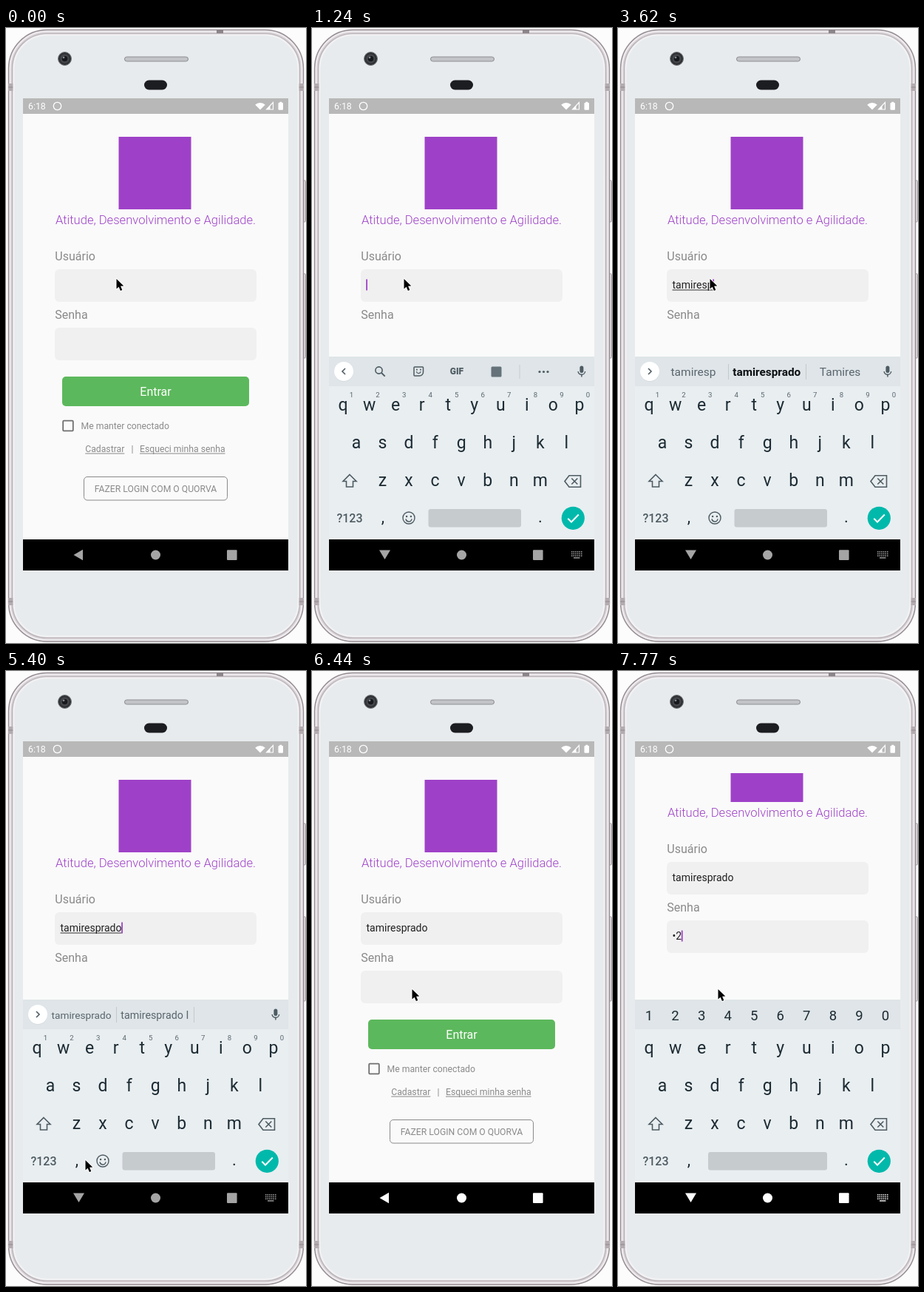
These frames come from a looping animation (406 by 831 pixels, 8000 ms). An HTML page with a canvas:

```html
<!DOCTYPE html>
<html lang="pt-BR">
<head>
<meta charset="utf-8">
<title>Login</title>
<style>
html, body { margin: 0; width: 100%; height: 100%; overflow: hidden; background: #fcfcfc; }
canvas { display: block; width: 406px; height: 831px; }
</style>
</head>
<body>
<canvas id="stage"></canvas>
<script>
const W = 406, H = 831, LOOP = 8000;
const canvas = document.getElementById('stage');
const ratio = window.devicePixelRatio || 1;
canvas.width = W * ratio;
canvas.height = H * ratio;
const c = canvas.getContext('2d');

const PURPLE = '#9e41c8', GREY = '#8a8a8a', INK = '#1c2b33', ICON = '#4d5b62';
const USER = 'tamiresprado', FIRST = 7;   // FIRST: letters in the given name
const KEY = 35.55;                        // distance between keys

// ---------- drawing helpers ----------
function paint(fill, stroke, lw) {
  if (fill) { c.fillStyle = fill; c.fill(); }
  if (stroke) { c.strokeStyle = stroke; c.lineWidth = lw; c.stroke(); }
}
function box(x, y, w, h, r, fill, stroke, lw = 1) {
  c.beginPath();
  c.roundRect(x, y, w, h, r);
  paint(fill, stroke, lw);
}
function disc(x, y, r, fill, stroke, lw = 1) {
  c.beginPath();
  c.arc(x, y, r, 0, Math.PI * 2);
  paint(fill, stroke, lw);
}
function arc(x, y, r, color, lw) {
  c.beginPath();
  c.arc(x, y, r, .1, Math.PI - .1);
  paint(null, color, lw);
}
function poly(points, fill, stroke, lw = 1, closed = true) {
  c.beginPath();
  for (let i = 0; i < points.length; i += 2) c.lineTo(points[i], points[i + 1]);
  if (closed) c.closePath();
  paint(fill, stroke, lw);
}
function line(points, color, lw) { poly(points, null, color, lw, false); }
function setFont(size, weight) { c.font = `${weight} ${size}px Roboto, sans-serif`; }
function text(str, x, y, size, color, align = 'left', weight = 400) {
  setFont(size, weight);
  c.textAlign = align;
  c.fillStyle = color;
  c.fillText(str, x, y);
  return c.measureText(str).width;
}
function keyRow(keys, x, y, size, color = INK) {
  [...keys].forEach((k, i) => text(k, x + i * KEY, y, size, color, 'center'));
}

const clamp = (v, lo, hi) => Math.min(hi, Math.max(lo, v));
const cap = s => s.charAt(0).toUpperCase() + s.slice(1);

const TICK = 148.4, LEAD = 500;
const OPEN = 3, CLOSE = 36, REOPEN = 41;
const bursts = [[9, 5], [16, 2], [21, 2], [24, 3]];   // start tick, letters
const path = [
  [-1, 149, 338], [2, 124, 338], [23, 124, 338], [27, 113, 674],
  [29, 113, 674], [33, 107, 660], [36, 96, 712], [40, 135, 429]
];

function mouseAt(k) {
  if (k <= path[0][0]) return path[0].slice(1);
  const i = path.findIndex(p => p[0] >= k);
  if (i < 0) return path[path.length - 1].slice(1);
  const [k0, x0, y0] = path[i - 1], [k1, x1, y1] = path[i];
  const u = (k - k0) / (k1 - k0), e = u * u * (3 - 2 * u);
  return [x0 + (x1 - x0) * e, y0 + (y1 - y0) * e];
}

const ramp = (k, from) => clamp((k - from) / 2, 0, 1);

function suggestions(n) {
  const now = USER.slice(0, n);
  if (n === USER.length) return [USER, USER + ' I', ''];
  if (n > FIRST + 1) return [now, USER, ''];
  if (n > FIRST) return [now, USER, cap(USER.slice(0, FIRST))];
  if (n === FIRST) return [now, cap(now), cap(USER.slice(0, 5))];
  return [now, cap(now), USER];
}

function stateAt(t) {
  const k = Math.floor((t - LEAD) / TICK + .1);
  const second = k > REOPEN;
  let n = 0, last = second ? REOPEN + 1 : OPEN + .5;
  for (const [start, len] of bursts) {
    n += clamp(k - start + 1, 0, len);
    if (!second && k >= start) last = Math.min(k, start + len - 1);
  }
  if (k >= 48) last = k;
  return {
    kb: ramp(k, OPEN) - ramp(k, CLOSE) + ramp(k, REOPEN),
    user: USER.slice(0, n),
    words: suggestions(n),
    pass: k >= 49 ? '•2' : k === 48 ? '1' : '',
    focus: second ? 2 : k > OPEN && k < CLOSE + 2 ? 1 : 0,
    scroll: k >= REOPEN + 2 ? 68 : 0,
    caret: Math.floor((k - last) / 3.4) % 2 === 0,
    bright: k >= CLOSE,
    mouse: mouseAt(k)
  };
}

// ---------- phone ----------
function phone() {
  c.fillStyle = '#fcfcfc';
  c.fillRect(0, 0, W, H);
  box(401, 206, 4.5, 56, 1.5, '#ddd8dc', '#a7a0a5');
  box(401, 332, 4.5, 114, 1.5, '#ddd8dc', '#a7a0a5');
  box(3.5, 2.5, 399, 826.5, 52, '#d9d4d8', '#958d92', 1.4);
  box(5.5, 4.5, 395, 822.5, 50, null, '#f2eff2', 1.5);
  box(8.5, 7.5, 389, 816.5, 47, null, '#b9b1b6', 1.2);
  for (const y of [75, 770]) {
    for (const x of [3, 396]) {
      box(x, y, 7, 10, 0, '#b3abb0');
      line([x, y + 5, x + 7, y + 5], '#8f878c', 1);
    }
  }
  box(285, 2, 9, 5, 0, '#8b8489');
  box(10.5, 9.5, 385, 812.5, 45, '#e8ebed', '#f1f2f4', 2);

  disc(79.5, 41.5, 9, '#303236', '#77797d');
  disc(79.5, 41.5, 6, '#45484d');
  disc(79.5, 41.5, 3.8, '#17191c');
  disc(78, 39.8, 1.4, '#858b91');
  box(160.5, 39, 86, 6, 3, '#c3c4c8', '#8c8d92');
  box(187, 70.5, 31, 13, 6.5, '#1c1d20');
}

function statusBar() {
  c.fillStyle = '#b8b8b8';
  c.fillRect(23, 95, 359, 21);
  text('6:18', 30, 110, 12.3, '#fff');
  disc(69.5, 105.5, 5.2, null, '#fff', 1.3);
  c.beginPath();
  c.moveTo(344, 110.5);
  c.arc(344, 110.5, 9.6, -Math.PI * .75, -Math.PI * .25);
  paint('#fff');
  poly([352.5, 110, 361.5, 110, 361.5, 100.5], null, '#fff', 1.1);
  poly([352.5, 110, 357.5, 110, 357.5, 104.7], '#fff');
  box(368.5, 101, 6.5, 9.8, 1, '#fff');
  box(370.3, 99.8, 3, 2, 0, '#fff');
}

function navBar(open, bright) {
  const color = bright ? '#fff' : '#a5a5a5';
  c.fillStyle = '#000';
  c.fillRect(23, 691, 359, 42);
  poly(open ? [91, 705.5, 106, 705.5, 98.5, 718] : [91.5, 712, 104, 704.8, 104, 719.2], color);
  disc(202.5, 712, 6.5, color);
  box(299, 705.3, 13.6, 13.6, 1, color);
  if (!open) return;
  for (let i = 0; i < 18; i++)
    box(351 + i % 6 * 2.6, 707 + Math.floor(i / 6) * 2.7, 1.5, 1.5, 0, color);
  box(354, 715.2, 8.5, 1.4, 0, color);
}

// ---------- login form ----------
function field(label, y, value, active, underline, caret) {
  text(label, 66.3, y - 12, 16, GREY);
  box(66, y, 273, 44, 6, '#f0f0f0');
  const w = text(value, 73.5, y + 26, 14, '#202020');
  if (active && underline && value) box(73.5, y + 27.6, w, 1, 0, '#333');
  if (active && caret) box(73.2 + w, y + 13.5, 1.8, 15, 0, PURPLE);
}

function link(label, x) {
  const w = text(label, x, 573, 12.22, GREY);
  box(x, 574.5, w, 1, 0, GREY);
}

function form(s) {
  c.save();
  c.beginPath();
  if (s.kb) c.rect(23, 138, 359, 262);
  else c.rect(23, 116, 359, 575);
  c.clip();
  c.translate(0, -s.scroll);

  box(152.5, 147, 98, 98, 0, PURPLE);
  text('Atitude, Desenvolvimento e Agilidade.', 202.5, 265, 16.6, PURPLE, 'center', 300);
  field('Usuário', 326, s.user, s.focus === 1, true, s.caret);
  field('Senha', 405, s.pass, s.focus === 2, false, s.caret);

  box(76, 471, 253, 40, 5, '#5cb85c');
  text('Entrar', 202.5, 497, 16, '#fff', 'center');
  box(77.2, 530.7, 13.6, 13.6, 1, null, '#6f6f6f', 1.8);
  text('Me manter conectado', 101.5, 542, 12.22, GREY);
  link('Cadastrar', 107.2);
  text('|', 171, 573, 12.22, GREY, 'center');
  link('Esqueci minha senha', 181);
  box(105.5, 606.5, 194, 31.5, 4.5, null, GREY);
  text('FAZER LOGIN COM O QUORVA', 202.5, 626.8, 12.22, GREY, 'center');
  c.restore();
}

// ---------- keyboard ----------
function tools() {
  disc(90.5, 462.5, 4.6, null, ICON, 1.6);
  line([94, 466, 98.7, 470.7], ICON, 1.9);
  box(138, 458, 12.5, 12, [1, 1, 5, 1], null, ICON, 1.5);
  box(141, 460.8, 1.8, 1.8, 0, ICON);
  box(146, 460.8, 1.8, 1.8, 0, ICON);
  arc(144.2, 463.8, 2.8, ICON, 1.2);
  text('GIF', 196, 468, 12, ICON, 'center', 900);
  box(242.5, 457.5, 14, 14, 1.5, '#65727a');
  line([281, 455, 281, 474], '#c6cdd1', 1);
  for (let i = 0; i < 3; i++) disc(308 + i * 5.5, 464.5, 1.6, ICON);
}

function strip(words) {
  for (const x of [149.5, 254.5]) line([x, 454, x, 475], '#c3cacf', 1);
  words.forEach((word, i) => {
    const strong = i === 1 && !word.endsWith(' I');
    const weight = strong ? 700 : 400, room = i === 1 ? 92 : 81;
    setFont(15.5, weight);
    const size = 15.5 * Math.min(1, room / (c.measureText(word).width || 1));
    text(word, 102 + i * 99.3, 470, size, strong ? '#0b0f12' : '#59666d', 'center', weight);
  });
}

function mic() {
  box(362.4, 456.5, 5, 9.5, 2.5, ICON);
  arc(364.9, 463.5, 4.8, ICON, 1.4);
  line([364.9, 468, 364.9, 471.5], ICON, 1.5);
}

function smile(x, y) {
  disc(x, y, 8, null, ICON, 1.4);
  disc(x - 2.9, y - 2, 1.2, ICON);
  disc(x + 2.9, y - 2, 1.2, ICON);
  arc(x, y + 1, 4, ICON, 1.4);
}

function keyboard(s) {
  const secret = s.focus === 2, digits = '1234567890';
  c.save();
  c.beginPath();
  c.rect(23, 444, 359, 247);
  c.clip();
  c.translate(0, (1 - s.kb) * 247);
  c.fillStyle = '#e9eef1';
  c.fillRect(23, 444, 359, 247);
  c.fillStyle = '#dfe5e8';
  c.fillRect(23, 444, 359, 40);

  if (secret) {
    keyRow(digits, 42, 471.5, 18.5);
  } else {
    const d = s.user ? 2 : -2;
    disc(43, 464.8, 13, '#d2d8dc');
    disc(43, 464, 13, '#fff');
    line([43 - d, 460, 43 + d, 464, 43 - d, 468], ICON, 1.6);
    if (s.user) strip(s.words); else tools();
    mic();
    keyRow(digits, 53.5, 499.3, 9.6, '#59666d');
    smile(131, 662);
  }
  keyRow('qwertyuiop', 42, 516.5, 23);
  keyRow('asdfghjkl', 60, 567.5, 23);
  keyRow('zxcvbnm', 95.5, 619, 23);

  poly([51, 603.5, 60, 612.5, 55.5, 612.5, 55.5, 620, 46.5, 620, 46.5, 612.5, 42, 612.5], null, ICON, 1.6);
  poly([342, 612.5, 348, 604.8, 363.5, 604.8, 363.5, 620.2, 348, 620.2], null, ICON, 1.6);
  for (const d of [-4, 4]) line([355.3 - d, 608.5, 355.3 + d, 616.5], ICON, 1.6);

  text('?123', 51, 668, 16, ICON, 'center', 500);
  text(',', 96, 668, 22, INK, 'center');
  text('.', 309, 668, 22, INK, 'center');
  const left = secret ? 122 : 157.5;
  box(left, 650, 283 - left, 24.5, 3, '#c6cbce');
  disc(353.3, 662.3, 15.6, '#00b9ab');
  line([346.3, 662.8, 351, 667.5, 360.8, 657.5], '#fff', 2);
  c.restore();
}

function pointer(x, y) {
  const arrow = [.5, 1, .5, 14.5, 3.6, 11.7, 5.9, 17, 8.3, 16, 6.1, 10.8, 10.3, 10.6];
  c.save();
  c.translate(x, y);
  c.lineJoin = 'round';
  poly(arrow, null, '#fff', 2);
  poly(arrow, '#000');
  c.restore();
}

function draw(t) {
  const s = stateAt(t);
  c.setTransform(ratio, 0, 0, ratio, 0, 0);
  phone();
  c.fillStyle = '#fafafa';
  c.fillRect(23, 116, 359, 575);
  form(s);
  if (s.kb) keyboard(s);
  statusBar();
  navBar(s.kb > 0, s.bright);
  pointer(...s.mouse);
}

const start = performance.now();
function tick() {
  draw((performance.now() - start) % LOOP);
  requestAnimationFrame(tick);
}
tick();
</script>
</body>
</html>
```
